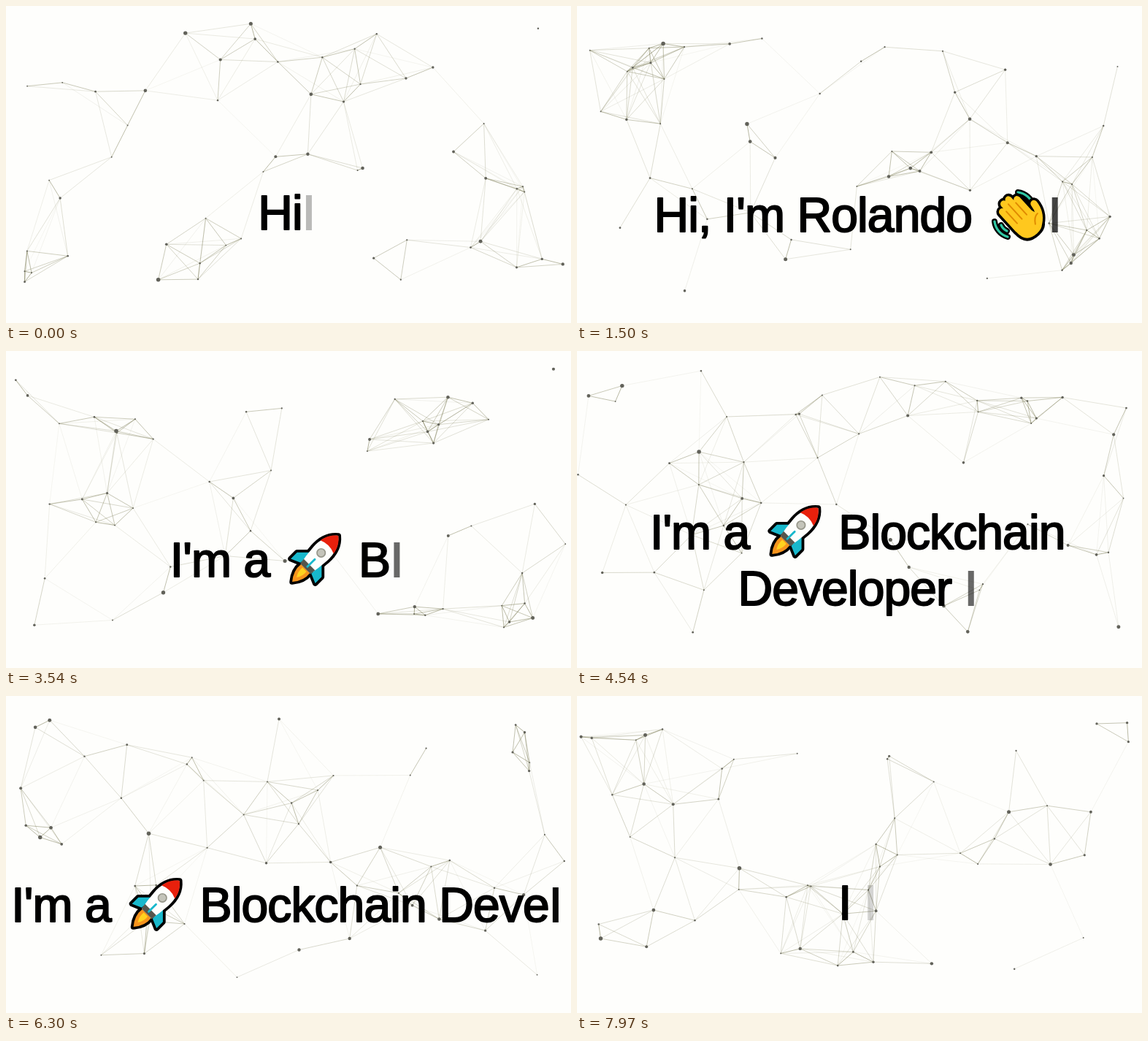
Recreate the animation shown at these times as an HTML page with a canvas. Size 774 by 434 pixels, loop 8000 ms.

```html
<!DOCTYPE html>
<html lang="en">
<head>
<meta charset="utf-8">
<title>Typed greeting</title>
<style>
  html, body { margin: 0; width: 100%; height: 100%; overflow: hidden; background: #fefefc; }
  canvas { display: block; }
</style>
</head>
<body>
<canvas id="stage" width="774" height="434"></canvas>
<script>
const ctx = document.getElementById('stage').getContext('2d');
const PAPER = '#fefefc';
const LOOP = 8000;
const BOX = { left: 0, right: 770, top: 24, bottom: 390 };
const DOTS = 54, LINK = 112;

// ---------- drifting network ----------

function seeded(seed) {
  return () => {
    seed = (seed + 0x6D2B79F5) | 0;
    let n = Math.imul(seed ^ (seed >>> 15), 1 | seed);
    n = (n + Math.imul(n ^ (n >>> 7), 61 | n)) ^ n;
    return ((n ^ (n >>> 14)) >>> 0) / 4294967296;
  };
}

const mix = (a, b, k) => a + (b - a) * k;
const rand = seeded(41);

const dots = Array.from({ length: DOTS }, () => {
  const angle = rand() * Math.PI * 2;
  const speed = mix(15, 95, rand());
  return {
    x: mix(BOX.left, BOX.right, rand()),
    y: mix(BOX.top, BOX.bottom, rand()),
    vx: Math.cos(angle) * speed,
    vy: Math.sin(angle) * speed,
    r: 0.9 + 1.9 * rand() ** 2
  };
});

const exitTime = (p, v, low, high) => ((v > 0 ? high : low) - p) / v;

// A dot that leaves comes back on the far side at a random place.
function place({ x, y, vx, vy, r }, index, time) {
  const next = seeded(index * 97 + 5);
  for (;;) {
    const tx = exitTime(x, vx, BOX.left, BOX.right);
    const ty = exitTime(y, vy, BOX.top, BOX.bottom);
    const step = Math.min(tx, ty);
    if (step >= time) return { x: x + vx * time, y: y + vy * time, r };
    time -= step;
    if (tx < ty) {
      x = vx > 0 ? BOX.left : BOX.right;
      y = mix(BOX.top, BOX.bottom, next());
    } else {
      y = vy > 0 ? BOX.top : BOX.bottom;
      x = mix(BOX.left, BOX.right, next());
    }
  }
}

function drawNetwork(time) {
  const points = dots.map((dot, i) => place(dot, i, time));
  ctx.lineWidth = 0.8;
  points.forEach((a, i) => {
    for (const b of points.slice(0, i)) {
      const near = 1 - Math.hypot(a.x - b.x, a.y - b.y) / LINK;
      if (near <= 0) continue;
      ctx.strokeStyle = `rgba(115, 115, 75, ${0.08 + 0.7 * near})`;
      ctx.beginPath();
      ctx.moveTo(a.x, a.y);
      ctx.lineTo(b.x, b.y);
      ctx.stroke();
    }
  });
  ctx.fillStyle = '#62625a';
  for (const p of points) {
    ctx.beginPath();
    ctx.arc(p.x, p.y, p.r, 0, Math.PI * 2);
    ctx.fill();
  }
}

// ---------- emoji ----------

function line(d, width, color) {
  ctx.lineWidth = width;
  ctx.strokeStyle = color;
  ctx.stroke(new Path2D(d));
}

function fill(d, color) {
  ctx.fillStyle = color;
  ctx.fill(new Path2D(d));
}

function drawRocket() {
  const fins = 'M-11 -2 L-25 12 V25 L-11 19 Z M11 -2 L25 12 V25 L11 19 Z';
  const flame = 'M-9 20 Q-11 34 0 47 Q11 34 9 20 Z';
  const body = 'M0 -47 C11 -38 15 -24 14 -10 Q13 6 10 20 H-10 Q-13 6 -14 -10 C-15 -24 -11 -38 0 -47 Z';
  ctx.translate(1.5, -1.5);
  ctx.rotate(Math.PI / 4);
  ctx.scale(0.95, 0.95);
  for (const d of [fins, flame, body]) line(d, 8, '#000');
  fill(fins, '#18b8cc');
  fill(flame, '#f7941d');
  fill('M-4 22 Q-5 31 0 38 Q5 31 4 22 Z', '#ffd21f');
  fill(body, PAPER);
  fill('M0 -47 C8 -41 12 -33 13.5 -24 Q0 -30 -13.5 -24 C-12 -33 -8 -41 0 -47 Z', '#e8200c');
  fill('M-11.5 12 H11.5 L10 20 H-10 Z', '#55554c');
  line('M0 1 V16', 3, '#18b8cc');
  const porthole = 'M-6 -12 A6 6 0 0 1 6 -12 A6 6 0 0 1 -6 -12';
  fill(porthole, '#c4c4ba');
  line(porthole, 1.8, '#96968a');
}

function drawWave() {
  const arcs = 'M2 -31 A25 25 0 0 1 23 -13 M6 -22 A16 16 0 0 1 14 -15 ' +
               'M-30 9 A25 25 0 0 0 -12 30 M-21 14 A16 16 0 0 0 -13 22';
  line(arcs, 8, '#000');
  line(arcs, 3.2, '#30c8a4');
  ctx.translate(6, 4);
  ctx.rotate(-0.74);
  ctx.scale(1.1, 1.1);
  const fingers = 'M-12 8 V-21 M-4 8 V-27 M4 8 V-27 M12 8 V-20 M12 20 Q23 12 24 -2';
  const palm = 'M-16 2 H16 L19 10 Q18 28 2 28 Q-16 28 -16 10 Z';
  line(fingers, 15, '#000');
  line(palm, 7, '#000');
  line(fingers, 8.6, '#ffc81e');
  fill(palm, '#ffc81e');
  line('M-8 -18 V2 M0 -23 V2 M8 -18 V2 M8 18 Q13 10 19 10', 1.8, '#e08a00');
}

const EMOJI = { '👋': drawWave, '🚀': drawRocket };
const EMOJI_WIDTH = 87;

// ---------- typed text ----------

const FIRST = Array.from("Hi, I'm Rolando 👋");
const SECOND = Array.from("I'm a 🚀 Blockchain Developer ");
const THIRD = Array.from('I ');
const TYPE = 50, ERASE = 65;
const CENTER = 384.2, MAX_WIDTH = 768;

const typed = (chars, start, t) => chars.slice(0, Math.max(0, Math.floor((t - start) / TYPE)));
const erased = (chars, start, t) =>
  chars.slice(0, Math.max(0, chars.length - 1 - Math.floor((t - start) / ERASE)));

function textAt(t) {
  if (t < 2000) return typed(FIRST, -100, t);
  if (t < 3060) return erased(FIRST, 2000, t);
  if (t < 5935) return typed(SECOND, 3060, t);
  if (t < 7820) return erased(SECOND, 5935, t);
  return typed(THIRD, 7820, t);
}

// close to the CSS "ease" curve
const ease = p => (1 - (1 - p) ** 2.6) * (1 - 0.45 * (1 - p) ** 3);

function cursorAlpha(t) {
  const p = ((t + 80) % 1000) / 500;
  return p < 1 ? ease(p) : 1 - ease(p - 1);
}

const runs = chars => chars.join('').split(/(👋|🚀)/u).filter(Boolean);
const runWidth = run => EMOJI[run] ? EMOJI_WIDTH : ctx.measureText(run).width;
const widthOf = chars => runs(chars).reduce((sum, run) => sum + runWidth(run), 0);

function ink(text, x, y) {
  ctx.lineWidth = 2;
  ctx.strokeStyle = ctx.fillStyle = '#000';
  ctx.strokeText(text, x, y);
  ctx.fillText(text, x, y);
}

// The cursor takes room only on the line that carries it.
function drawLine(chars, y, cursor = null) {
  const total = widthOf(chars) + (cursor === null ? 0 : runWidth('I'));
  let x = CENTER - total / 2;
  for (const run of runs(chars)) {
    if (EMOJI[run]) {
      ctx.save();
      ctx.translate(x + EMOJI_WIDTH / 2, y - 23);
      EMOJI[run]();
      ctx.restore();
    } else {
      ink(run, x, y);
    }
    x += runWidth(run);
  }
  if (cursor > 0.12) {
    ctx.fillStyle = `rgba(0, 0, 0, ${cursor})`;
    ctx.fillRect(x + 5.2, y - 47, 8, 48);
  }
}

function drawText(t) {
  ctx.font = '66px "Liberation Sans", Arial, sans-serif';
  ctx.letterSpacing = '-0.9px';
  ctx.lineJoin = ctx.lineCap = 'round';
  const chars = textAt(t);
  const cursor = cursorAlpha(t);
  const base = chars.some(c => EMOJI[c]) ? 309 : 306;
  if (widthOf(chars) + runWidth('I') <= MAX_WIDTH) {
    drawLine(chars, base, cursor);
    return;
  }
  const cut = chars.lastIndexOf(' ', chars.length - 2);
  drawLine(chars.slice(0, cut), base - 38);
  drawLine(chars.slice(cut + 1), base + 39, cursor);
}

// ---------- loop ----------

const begin = performance.now();

function frame() {
  const t = (performance.now() - begin) % LOOP;
  ctx.fillStyle = PAPER;
  ctx.fillRect(0, 0, 774, 434);
  drawNetwork(t / 1000);
  drawText(t);
  requestAnimationFrame(frame);
}
frame();
</script>
</body>
</html>
```
